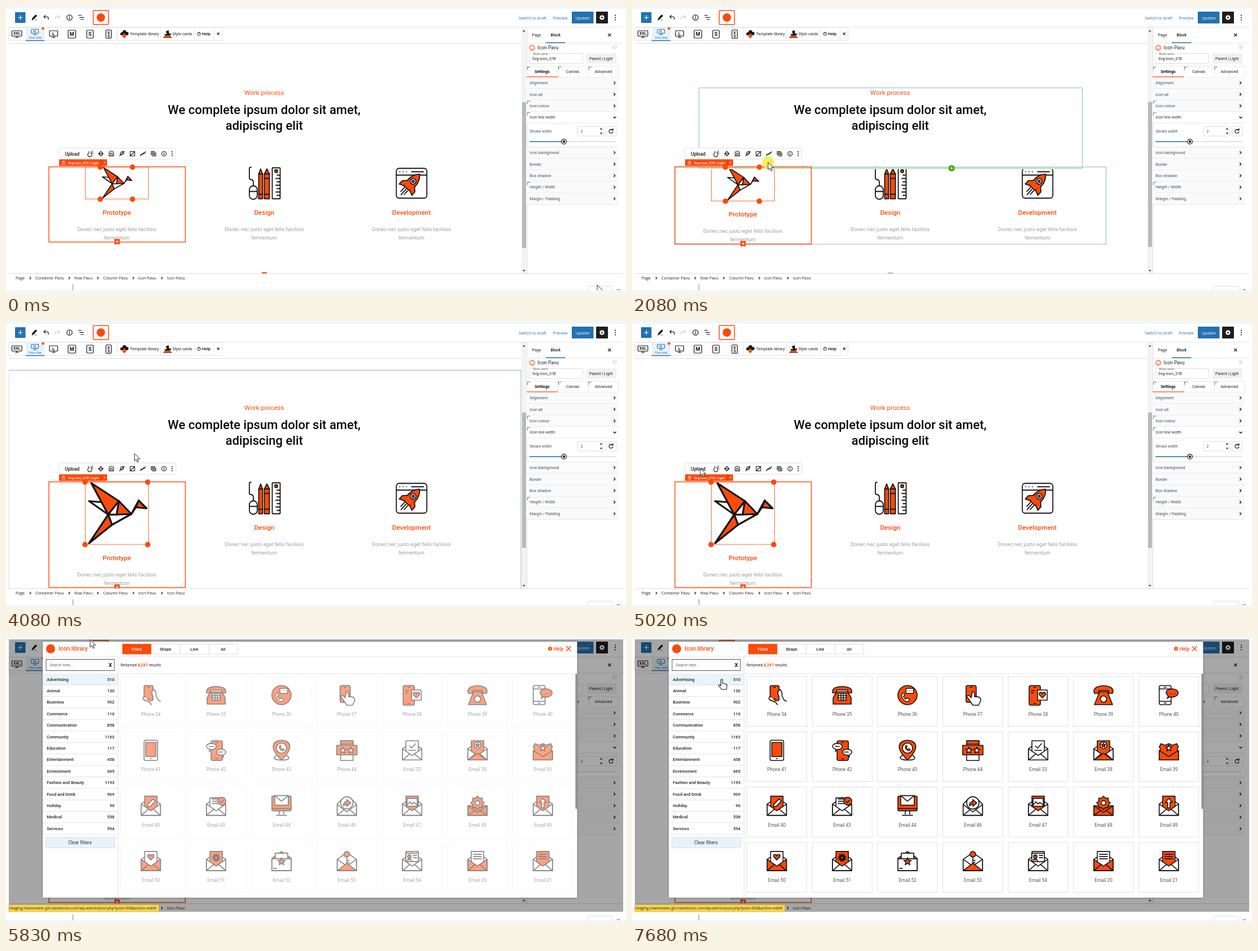
Write an HTML page that moves like this. It is 1098x510 px and loops after 8000 ms.

```html
<!DOCTYPE html>
<html lang="en">
<head>
<meta charset="utf-8">
<title>Icon library</title>
<style>
html,body{margin:0;width:100%;height:100%;overflow:hidden;background:#fff}
svg{display:block;width:100%;height:100%}
text{font-family:Roboto,sans-serif;white-space:pre}
.ui{font-family:"Open Sans","Noto Sans",sans-serif}
</style>
</head>
<body>
<svg id="stage" viewBox="0 0 1098 510"></svg>
<script>
const O = '#fc4a0b', INK = '#141414', BLUE = '#2271b1', SKY = '#86bcd6', W = '#fff';

// Drawing helpers
const R = (x, y, w, h, f = W, r = 0, more = '') => `<rect x="${x}" y="${y}" width="${w}" height="${h}" fill="${f}" rx="${r}" ${more}/>`;
const C = (x, y, r, f = W, more = '') => `<circle cx="${x}" cy="${y}" r="${r}" fill="${f}" ${more}/>`;
const P = (d, f = 'none', more = '') => `<path d="${d}" fill="${f}" ${more}/>`;
const T = (x, y, s, size = 7.05, f = '#222', more = '') => `<text x="${x}" y="${y}" font-size="${size}" fill="${f}" ${more}>${s}</text>`;
const G = (s, more = '') => `<g ${more}>${s}</g>`;
const at = (x, y, s, more = '') => G(s, `transform="translate(${x} ${y})" ${more}`);
const L = (d, c = INK, w = 1) => P(d, 'none', `stroke="${c}" stroke-width="${w}"`);
const MID = 'text-anchor="middle"', MED = 'font-weight="500"', BOLD = 'font-weight="700"', UI = 'class="ui"';
const pen = (w, c = INK) => `stroke="${c}" stroke-width="${w}" stroke-linejoin="round" stroke-linecap="round"`;
const chev = (x, y, s = 2.5, w = 1.3) => L(`M${x - s / 2} ${y - s}l${s} ${s}l${-s} ${s}`, INK, w);
const burst = (n, r, q, f, x = 0, y = 0) => {
  const pts = [];
  for (let i = 0; i < n * 2; i++) {
    const a = i * Math.PI / n - Math.PI / 2, k = i % 2 ? q : r;
    pts.push((x + k * Math.cos(a)).toFixed(1) + ' ' + (y + k * Math.sin(a)).toFixed(1));
  }
  return P('M' + pts.join('L') + 'Z', f);
};
const heart = (x, y, f) => P(`M${x} ${y + 5}l-5 -5c-3 -5 4 -7 5 -2c1 -5 8 -3 5 2z`, f);
const handset = (x, y, s, f) => at(x, y, P('M-5 -6C-8 1 0 9 6 6L7 3 3 1 1 3C-1 2 -3 0 -3 -2L-1 -3 -2 -7Z', f), `stroke-width="${1.3 / s}" `).replace(')"', `) scale(${s})"`);

function header() {
  let s = R(16, 11, 18.5, 19, BLUE, 1) + L('M21.5 20.5h8M25.5 16.5v8', W, 1.2);
  s += P('M46 25l1-3.5 5.5-6 2.2 2-5.7 6zM51 25h3', INK, pen(.7));
  s += P('M75 24v-2.5q0-2.5-3-2.5h-5m2.7-2.7-2.7 2.7 2.7 2.7', 'none', pen(1.2));
  s += P('M87 24v-2.5q0-2.5 3-2.5h5m-2.7-2.7 2.7 2.7-2.7 2.7', 'none', pen(1.1, '#ccc'));
  s += C(112.5, 20.5, 4.7, 'none', pen(1.2)) + L('M112.5 19.5v3.5M112.5 17.6v1.2', INK, 1.2);
  s += L('M128 16.5h6M130 20.3h8M132 24h6', INK, 1.2);
  s += R(154.5, 8, 27, 25, W, 1, pen(1.5, O)) + C(168, 20.5, 7.5, O);
  s += T(908, 23.6, 'Switch to draft', 7.25, BLUE, UI) + T(968.5, 23.6, 'Preview', 7.25, BLUE, UI);
  s += R(1002, 10, 38.5, 21, BLUE, 1) + T(1021.3, 23.6, 'Update', 7.3, W, UI + MID);
  s += R(1045, 10, 21, 21, '#1e1e1e', 1) + burst(8, 5, 3.6, W, 1055.5, 20.5) + C(1055.5, 20.5, 1.5, '#1e1e1e');
  return s + [16.5, 20.5, 24.5].map(y => C(1079, y, 1.1, INK)).join('') + L('M5 37.5H1093', '#e3e3e3');
}

const monitor = (x, y, w, h, label, c, size) =>
  R(x, y, w, h, W, 1, pen(1.2, c)) + P(`M${x + w / 2} ${y + h}v2.5m-3 0h6`, 'none', pen(1.2, c)) +
  T(x + w / 2, y + h / 2 + size * .36, label, size, c, MID + BOLD);
const device = (x, y, w, h, label) => R(x, y, w, h, W, 1.5, pen(1.2)) + T(x + w / 2, 53.2, label, 9, INK, MID + BOLD);

function sizeBar() {
  let s = R(5, 38, 377.5, 23.5, W, 0, 'stroke="#ddd" stroke-width=".8"') + R(35, 38, 33, 23, '#e8f2f8');
  s += L('M35 61.5h33', BLUE, 1.3) + C(65.5, 40, 2.3, O);
  s += monitor(10.5, 44, 17.5, 9.5, 'XXL', INK, 7) + monitor(45, 41.5, 12.5, 7, 'XL', BLUE, 6);
  s += T(51.5, 58.3, 'Your size', 5.6, BLUE, MID) + monitor(77, 44, 14.5, 9.5, 'L', INK, 8);
  s += device(110, 43, 13.5, 14, 'M') + device(143, 43, 11.5, 14, 'S') + R(177, 42.5, 9.5, 15, W, 1.5, pen(1.2));
  s += T(181.8, 49.7, 'X', 7, INK, MID + BOLD) + T(181.8, 56.3, 'S', 7, INK, MID + BOLD);
  s += P('M203 52c-2-5 2-6 3-5 1-6 7-5 7-1 5-1 5 5 2 6z', INK) + P('M207.5 49h4v4h2.5l-4.5 4.5-4.5-4.5h2.5z', O);
  s += T(219.7, 52.3, 'Template library', 7.15) + P('M279 56l4-4h6l4 4z', O, pen(.8)) + P('M280 50h5l-2-5 5-2 1 6h4l-2 3h-9z', INK);
  s += T(294.7, 52.3, 'Style cards', 7.15) + L('M197.5 38v23M273.5 38v23M333.5 38v23M368.5 38v23', '#e5e5e5');
  s += C(341.7, 49.5, 2.9, 'none', pen(.9)) + T(341.7, 51.4, '?', 5, INK, MID + BOLD) + T(347, 52.3, 'Help', 7.4, INK, MED);
  return s + L('M373.8 47.3l4 4m0-4l-4 4', INK, 1.2) + L('M5 66.5H913', '#ddd');
}

function sidebar() {
  const mark = (x, y) => L(`M${x} ${y + 5}v-5h5`, '#35a56c', 1.1);
  let s = R(922, 38, 171, 437) + L('M922.5 38V475', '#ddd') + T(931.5, 54, 'Page') + T(964.5, 54, 'Block', 7.1, '#111', MED);
  s += L('M922 66H1093', '#e3e3e3') + L('M956 65.3h34.5', BLUE, 1.5) + L('M1066.3 49l5 5m0-5l-5 5', INK, 1.1);
  s += C(932, 74.5, 4.4, W, pen(1.1, O)) + P('M929.5 75.5q2.5 3 5 0M930.5 73v.1M933.5 73v.1', 'none', pen(1, O));
  s += T(941.5, 77, 'Icon Pavu', 8.5) + C(1077.7, 73, 3.4, W, pen(.5, '#9ac')) + T(1077.7, 75, 'i', 5.5, BLUE, MID);
  s += R(926.5, 84.5, 95, 18, W, 1, 'stroke="#ddd"') + R(932, 83, 28, 4) + T(933.5, 87, 'Block name', 5, '#555');
  s += T(932, 95.6, 'Svg-icon_378') + R(1028, 84, 53, 18.5, '#f1f1f1') + T(1033, 95.6, 'Parent | Light', 7.05);
  s += R(922, 107, 163, 19.5, W, 0, 'stroke="#e6e6e6"') + L('M977.5 107v19M1031.5 107v19', '#e6e6e6') + L('M922 126h55.5', O, 1.5);
  s += T(949.5, 119.2, 'Settings', 7.1, '#111', MID + BOLD) + T(1003.7, 119.2, 'Canvas', 7.05, '#222', MID) + T(1058, 119.2, 'Advanced', 7.05, '#222', MID);
  s += mark(923.5, 108.5) + mark(978.5, 108.5) + mark(1032, 108.5);
  const rows = ['Alignment', 'Icon alt', 'Icon colour', 'Icon line width', 'Icon background', 'Border', 'Box shadow', 'Height / Width', 'Margin / Padding'];
  rows.forEach((name, i) => {
    const y = 136.6 + i * 20.45 + (i > 3 ? 42.2 : 0), open = i === 3;
    s += R(922, y - 10, 163, 20.4, open ? W : '#fafafa') + L(`M922 ${y + 10.2}h163`, '#e6e6e6') + T(927.3, y + 2.5, name, 7.05, open ? '#333' : '#35526d');
    s += open ? L(`M1075.5 ${y - 1.2}l2.5 2.5l2.5-2.5`, INK, 1.3) : chev(1077.5, y);
    if (i === 2 || i === 3 || i === 7) s += mark(923.5, y - 8.5);
  });
  s += L('M922 250.5h163', '#e6e6e6') + T(927.3, 225, 'Stroke width', 7.05, '#35526d');
  s += R(1012.5, 214, 45.5, 17, W, 1, 'stroke="#ddd"') + T(1017.5, 225, '2', 7.05, '#35526d');
  s += P('M1051.7 219.5l2.3-3 2.3 3zM1051.7 225.2l2.3 3 2.3-3z', '#333') + R(1062.5, 214, 18.5, 17, W, 1, 'stroke="#ddd"');
  s += P('M1074.3 220.5a3.5 3.5 0 1 0 .6 3M1075 217.7v3h-3', 'none', pen(1.2));
  return s + L('M927 241h153', '#d5dbe0', 1.3) + L('M927 241h61', BLUE, 1.5) + C(988, 241, 4.4, W, pen(1.2)) + C(988, 241, 2.2, INK);
}

function footer() {
  let s = R(5, 475, 1088, 30) + L('M5 475.5H1093', '#ddd');
  const crumbs = { 17: 'Page', 52: 'Container Pavu', 121: 'Row Pavu', 172: 'Column Pavu', 234: 'Icon Pavu', 285: 'Icon Pavu' };
  for (const x in crumbs) s += T(x, 486.2, crumbs[x], 7.1, '#222', UI);
  [43, 112, 162.5, 225.5, 276].forEach(x => s += chev(x, 483.5, 2, 1.1));
  s += L('M118.5 494.5V505', '#888') + T(17, 510.5, 'Custom fields', 8, '#555', UI) + R(1030, 498, 44, 15, W, 2, 'stroke="#d5dbe2"');
  return s + T(1037, 510.5, 'Clear all', 8, '#5a7fd0', UI) + L('M1082 503l5 5m0-5l-5 5', '#333');
}

const bird = () => G([
  ['M7 34L30 36 41 58Z', W], ['M11 2L60 34 41 58Z', O], ['M41 58L48 76 7 109Z', O], ['M41 58L82 57 48 76Z', W],
  ['M41 58L60 34 56 58Z', W], ['M60 34L82 57 56 58Z', O], ['M82 57L95 33 90 45Z', W], ['M95 33L109 47 90 45Z', O]
].map(p => P(...p)).join(''), pen(3.2));

const design = () => G(
  R(-26, 5, 14, 24, W, 7) + P('M-26 15h14M-19 5v-6q0-5-4-5t-3-6v-14q0-2 3-2') +
  P('M-9.5-16l3.5-9 3.5 9v44h-7z', O) + P('M-9.5-16h7M-9.5 20h7') +
  P('M.5-16l4.5-9 4.5 9v44h-9z', O) + P('M.5-16h9M.5-8h9M.5 20h9') +
  R(14.5, -27, 14, 55, W, 1) + C(21.5, -21, 2.5, O) + P('M28-14h-5m5 6h-7m7 6h-5m5 6h-7m7 6h-5m5 6h-7m7 6h-5'), pen(1.8));

const rocket = () => G(
  R(-27, -26, 54, 53, W, 5) + P('M-27-14h54M-21-20v.1M-15-20v.1M-9-20v.1M0-20h21') +
  G(P('M0-20C11-10 10 5 6 14h-12C-10 5-11-10 0-20Z', O) + P('M-8 2l-7 7v8l9-4M8 2l7 7v8l-9-4M-4 16v9M0 16v13M4 16v9', O) + C(0, -3, 5) + C(0, -3, 2, O), 'transform="rotate(42) translate(0 -1)"'), pen(1.8));

function page() {
  let s = T(457.3, 157.7, 'Work process', 11.6, O, MID);
  s += T(457.3, 191.7, 'We complete ipsum dolor sit amet,', 22, '#080808', MID + MED) + T(457.3, 219.7, 'adipiscing elit', 22, '#080808', MID + MED);
  const copy = (x, name) => T(x, 370.6, name, 11.6, O, MID + MED) + T(x, 399.5, 'Donec nec justo eget felis facilisis', 9.27, '#9d9d9d', MID) + T(x, 414.7, 'fermentum', 9.27, '#9d9d9d', MID);
  s += copy(457.3, 'Design') + copy(718, 'Development') + at(457, 314.5, design()) + at(718.3, 314.5, rocket());
  s += G(copy(196.3, 'Prototype'), 'id="proto"');
  s += R(5, 87.5, 907, 500, 'none', 0, `id="section" stroke="${SKY}"`);
  s += R(76, 286, 763.5, 136, 'none', 0, `id="row" stroke="${SKY}"`);
  s += G(bird(), 'id="bird"');
  s += R(140.5, 286, 112, 57, 'none', 0, `id="frame" stroke="${O}" stroke-width=".8"`);
  s += G([0, 1, 2, 3].map(() => C(0, 0, 4.8, O)).join(''), 'id="knobs"');
  s += G(R(118.5, 145.5, 679, 141, 'none', 0, `stroke="${SKY}"`) + R(119, 286.5, 678, 3.5) + L('M118 288.3H798', '#bfe3a8', 2.6) +
    C(566, 288.3, 5.5, '#36a80b') + L('M563.3 288.3h5.4M566 285.6v5.4', W, 1) + L('M453 475h9', '#555', 1.5), 'id="heading"');
  s += R(76, 285.8, 241.5, 134, 'none', 0, `id="column" stroke="${O}" stroke-width="1.4"`);
  s += G(R(192, 414, 9.5, 9.5, O) + L('M194 418.8h5.5M196.8 416v5.5', W, 1), 'id="add"');
  s += R(453, 473, 9, 3, O, 0, 'id="stub"');
  return G(s, 'clip-path="url(#view)"');
}

function blockBar() {
  let s = R(94, 253, 206, 19, W, 1, 'stroke="#d9d9d9" filter="url(#soft)"') + R(94, 253, 206, 19, W, 1, 'stroke="#e2e2e2" stroke-width=".7"');
  s += T(104.3, 265.6, 'Upload', 8.2, INK, MED);
  const icons = ['M-3-1a3.5 3.5 0 1 0 5 1M-4-3h3M1-1l3-4M3-1h2', 'M-4 0l4-4 4 4-4 4zM-4 0h8', 'M-4 4v-5a4 3.5 0 0 1 8 0v5zM-1.5 4v-5h3v5', 'M-4 4l8-8M-3 1q0-5 6-5 1 6-4 6z',
    'M-4-4h8v8h-8zM-4 4l8-8', 'M-4 4q-1-2 1-3l2-1M4-4q1 2-1 3l-2 1M-2 2l4-4', 'M-4-4h6v6h-6zM-2 4h6v-6M-1-3v4M-3-1h4', 'M-4 0a4 4 0 1 0 8 0a4 4 0 1 0-8 0M0-2v4'];
  icons.forEach((d, i) => s += at(149.3 + i * 18.65, 262.5, P(d), pen(1.1)));
  s += [259, 262.5, 266].map(y => C(294.3, y, 1.1, INK)).join('');
  s += R(94, 272.5, 85, 11.7, O, 1) + R(100, 277.7, 4, 3.5, 'none', 0, pen(.7, W)) + L('M101 277.5v-2h2v2', W, .7);
  return s + T(110, 280.6, 'Svg-icon_378 | Light', 6, W, MED) + L('M169.5 272.5v11.5', '#b53000', .8) + chev(174.5, 278.4, 1.6, .9).replace(INK, W);
}

// Library icons, drawn around 0,0 within about 36 px
const mob = (x, y, w, h, f) => R(x, y, w, h, f, 3) + P(`M${x + w / 2 - 2} ${y + h - 3}h4M${x + w / 2 - 2} ${y + 3}h4`);
const env = (letter, front, inside, y = -17) => P('M-17-3L0-15 17-3V17H-17Z', W) + R(-11, y, 22, 26, letter) + inside +
  P('M-17-3L0 9 17-3V17H-17Z', front) + P('M-17 17L-4 6M17 17L4 6');
const lines = 'M-7-12h14M-7-8h14M-7-4h14';
const library = [
  ['Phone 34', mob(-12, -17, 16, 27, O) + P('M-10 3q-6 0-3 5l11 5 3 4M4 3q-5-8 1-13 5 3 4 11l4 8 4 2', W)],
  ['Phone 35', P('M-10-6H10L16 5v11H-16V5Z', O) + P('M-17-7C-17-18 17-18 17-7v3h-7v-5h-20v5h-7Z', O) + R(-7, -3, 14, 12) + P('M-7 1H7M-7 5H7M-2-3V9M2-3V9')],
  ['Phone 36', C(0, 0, 17, O) + handset(-4, 4, 1.1, W) + R(-3, -12, 14, 9, W, 2) + P('M0-7.5h.1M4-7.5h.1M8-7.5h.1')],
  ['Phone 37', mob(-12, -17, 18, 30, O) + P('M-11 2q4-4 8 3l2-10q3-3 4 2v6q12-1 11 7l-4 8h-10z', W)],
  ['Phone 38', mob(-16, -17, 20, 35, O) + P('M-12-8h6M-12-4h4') + R(-1, -9, 17, 18) + heart(7.5, 0, O)],
  ['Phone 39', P('M-7-6H7L16 17H-16Z', O) + P('M-17-7C-17-20 17-20 17-7l-1 4h-7l-1-5h-16l-1 5h-7Z', O) + C(0, 7, 5.5)],
  ['Phone 40', mob(-17, -17, 21, 34, W) + P('M-17-11H4M-17 11H4') + P('M-3 6l2-4C-10-8 0-11 6-11s15 5 8 12q-5 4-13 2z', O) + P('M2-2h.1M6-2h.1M10-2h.1')],
  ['Phone 41', R(-12, -18, 24, 36, W, 3) + R(-9, -14, 18, 25, O) + P('M-1 14.5h2')],
  ['Phone 42', mob(-9, -17, 20, 35, O) + P('M-12 2l1-4q-7-2-6-6 2-5 9-4 9 0 8 6-2 5-8 4z', W) + P('M13 12l-1-4q6-2 5-6-2-4-8-4-9 0-8 6 2 5 8 4z', W) + P('M-12-7h7M4 3h7')],
  ['Phone 43', P('M-9 9C-28 19 28 21 9 9', W) + P('M0 17C-26-8-12-18 0-18S26-8 0 17Z', O) + C(0, -4, 9) + handset(0, -4, .7, O)],
  ['Phone 44', R(-11, -17, 22, 35, W) + R(-11, -17, 22, 6, O) + R(-18, -9, 36, 17, O) + burst(5, 6, 2.6, W, -7, 0) + burst(5, 6, 2.6, W, 7, 0)],
  ['Email 33', env(W, W, P('M-5-8l4 4 7-8') + P('M-6 0h12'))],
  ['Email 38', env(O, W, C(0, -9, 6) + burst(5, 4, 1.8, O, 0, -9)) + P('M-17 17L0 5 17 17Z', O)],
  ['Email 39', P('M-17-6q4 3 0 8v15h34V2q-4-5 0-8l-3-6-7 3-7-3-7 3-7-3z', O) + burst(5, 6, 2.5, W, 0, -4) + P('M-17 0L0 11 17 0V17H-17Z', O)],
  ['Email 40', env(O, W, P('M-6 2l1-5 9-9 4 4-9 9z', W))],
  ['Email 43', env(W, W, P(lines), -14) + C(10, -8, 7, O) + P('M7-8l2 3 4-5')],
  ['Email 44', R(-17, -17, 34, 26, O, 2) + P('M-17 5h34M-4 9v6M4 9v6M-9 17H9') + R(-12, -18, 24, 17) + P('M-12-18L0-8 12-18')],
  ['Email 46', P('M-17-3L-9-11h18L17-3V17H-17Z', W) + C(0, -5, 11) + P('M-6 0q0-7 6-7v-4l7 6-7 6v-4z', O) + P('M-17-2L0 11 17-2V17H-17Z', W) + P('M-17 17L-5 7M17 17L5 7')],
  ['Email 47', env(O, W, R(-9, -13, 18, 14) + P('M-9-1l5-6 4 4 3-3 6 5'))],
  ['Email 48', P('M-17 0H17V17H-17Z', O) + burst(8, 12, 9, O, 0, -5) + C(0, -5, 4) + P('M-17 0L0 12 17 0V17H-17Z', O) + P('M-17 17L-4 8M17 17L4 8')],
  ['Email 49', env(O, W, P('M-2 4v-10h-4l6-7 6 7h-4v10z', W))],
  ['Email 50', env(W, O, heart(0, -7, O))],
  ['Email 51', env(O, W, burst(9, 7, 4, INK, 0, -6) + C(0, -6, 2.5, O))],
  ['Email 52', P('M-17-5L0-17 17-5V17H-17Z', O) + R(-11, -14, 22, 18) + P('M-17-4H17V17H-17Z', W) + burst(5, 7, 3, O, 0, 1) + P('M-14 13h5')],
  ['Email 53', P('M-17-3L0-15 17-3V17H-17Z', W) + C(0, -12, 5, O) + P('M0-7V8M0 3h4M0-1h4') + P('M-17-3L0 9 17-3V17H-17Z', W) + P('M-17 17L0 4 17 17Z', O)],
  ['Email 54', env(W, W, R(-11, -14, 22, 15) + C(-5, -8, 3, O) + P('M-9-1q4-6 8 0M2-10h6M2-6h6', O))],
  ['Email 20', env(W, O, P(lines))],
  ['Email 21', env(O, W, P(lines))]
];

const cats = { Advertising: 510, Animal: 130, Business: 902, Commerce: 116, Communication: 858, Community: 1163, Education: 117, Entertainment: 458,
  Environment: 665, 'Fashion and Beauty': 1193, 'Food and Drink': 909, Holiday: 96, Medical: 538, Services: 594 };
const PITCH = 20.4;

function modal() {
  let s = R(65, 10, 946.5, 455, '#000', 0, 'opacity=".45" filter="url(#soft)"') + R(65, 10, 946.5, 455) + C(79, 22.8, 8, O);
  s += T(93, 26.4, 'Icon library', 10.4, O, MED);
  ['Filled', 'Shape', 'Line', 'All'].forEach((name, i) => {
    s += R(206.5 + i * 51, 14.5, 51, 17.5, i ? W : O, 0, `stroke="${i ? '#d5d5d5' : O}" stroke-width=".8"`) + T(231.5 + i * 51, 25.7, name, 7.4, i ? '#222' : W, MID + MED);
  });
  s += C(963.5, 22.5, 3.5, O) + T(963.5, 24.7, '?', 6, W, MID + BOLD) + T(969.5, 25.6, 'Help', 8.6, O, MED) + L('M992 18.2l8.5 8.5m0-8.5l-8.5 8.5', O, 1.4);
  s += L('M65 37H1011M198.5 37V465M198 67H1008', '#e4e4e4') + R(71, 41.5, 121, 20, W, 0, 'stroke="#444" stroke-width=".9"');
  s += T(77.5, 54, 'Search here...', 6.9, '#666') + T(184.7, 55.4, 'X', 9.3, INK, MID + BOLD) + L('M77.5 47v9', INK, .9).replace('<path', '<path id="caret"');
  s += T(203, 54, `Returned <tspan fill="${O}" ${BOLD}>8,247</tspan> results`, 7.1);
  s += R(65.5, 67.2, 132.5, PITCH, '#e9f3f9', 0, 'id="hover"');
  Object.keys(cats).forEach((name, i) => {
    const y = 77 + i * PITCH;
    s += L(`M65 ${y + 10.2}h133`, '#e4e4e4') + T(72.3, y + 2.6, name, 7.5, '#222', MED) + T(192, y + 2.6, cats[name], 7.5, '#222', 'text-anchor="end" ' + MED);
  });
  s += R(70.5, 357.5, 122.5, 19, '#e8f2f8', 0, 'stroke="#d3dde3" stroke-width=".8"') + T(131, 369.8, 'Clear filters', 8.2, '#333', MID);
  let borders = '', cards = '';
  library.forEach(([name, art], i) => {
    const x = 203.5 + i % 7 * 115.7, y = 72 + Math.floor(i / 7) * 98.3;
    borders += R(x, y, 106, 88.5, 'none', 0, 'stroke="#d9dce1" stroke-width=".9"');
    cards += at(x + 53, y + 33, art, 'fill="none" ' + pen(1.6)) + T(x + 53, y + 70, name, 8.2, '#555', MID);
  });
  return s + G(borders, 'id="borders"') + G(cards, 'id="cards"') + R(1008.5, 67, 3, 240, '#8a8a8a');
}

const cursors = G(P('M0 0V13L3 10.2 5 15 7.3 14 5.2 9.3H9.3Z', W, pen(.9)), 'id="arrow"') +
  G(P('M-1.5 1.5C-1.5-.8 1.5-.8 1.5 1.5V7L7 8.2C9 8.7 9.5 10 9.2 11.5L8 18H0L-5.5 11.5C-6 10-4.5 9-3 10L-1.5 11.5Z', W, pen(1.1)), 'id="hand"') +
  G(P('M7.5-7.5v6l-2-2-9 9 2 2h-6v-6l2 2 9-9-2-2z', '#fff6c8', pen(.9, '#7a5a20')), 'id="resize"');

document.getElementById('stage').innerHTML =
  `<defs><clipPath id="view"><rect x="5" y="67" width="908" height="408.5"/></clipPath>
  <filter id="soft" x="-10%" y="-20%" width="120%" height="150%"><feGaussianBlur stdDeviation="1.5"/></filter></defs>` +
  R(0, 0, 1098, 510) + page() + header() + sizeBar() +
  R(913, 38, 8.5, 437, '#f3f3f3') + R(914, 171, 7, 259, '#b9b9b9', 0, 'id="thumb"') + P('M914.8 45.5l2.4-3 2.4 3zM914.8 469l2.4 3 2.4-3z', '#444') +
  blockBar() + G('', 'id="front"') + sidebar() + footer() + R(5, 6, 1088, 484, '#000', 0, 'id="shade"') + G(modal(), 'id="modal"') +
  G(R(5, 477.5, 266, 12.5, '#f9d84c', 0, 'stroke="#b99a2a" stroke-width=".6"') + T(5, 486.4, '/staging.maximaster.git.maxiblocks.com/wp-admin/post.php?post=504&amp;action=edit#', 6.6, '#222', UI), 'id="link"') +
  G(C(0, 0, 10.5, '#f9ec35', 'id="press"') + cursors, 'id="mouse"') +
  R(0, 0, 1098, 5.3, '#f0f7fb') + R(0, 505, 1098, 5, '#f0f7fb');

const $ = {};
document.querySelectorAll('[id]').forEach(e => $[e.id] = e);
$.front.append($.knobs);

const set = (e, o) => { for (const k in o) e.setAttribute(k, o[k]); };
const show = (e, on) => e.setAttribute('display', on ? 'inline' : 'none');
const within = (t, a, b) => t >= a && t < b;
const ramp = (t, a, b) => Math.min(1, Math.max(0, (t - a) / (b - a)));

// Eased value of a keyed track: [time, value...]
function track(keys, t) {
  let i = 0;
  while (i < keys.length - 2 && t >= keys[i + 1][0]) i++;
  const a = keys[i], b = keys[i + 1], u = ramp(t, a[0], b[0]), k = u * u * (3 - 2 * u);
  return a.slice(1).map((v, j) => v + (b[j + 1] - v) * k);
}
const path = [[70, 1047, 496], [580, 229, 297], [1200, 229, 297], [1600, 238, 282], [2010, 238, 282], [2080, 241, 278], [2760, 289, 223], [3730, 289, 223],
  [4490, 150, 252], [5020, 121, 262], [5300, 121, 262], [5490, 119, 261], [5830, 149, 7], [6140, 149, 7], [6500, 166, 78], [7550, 166, 78], [7680, 159, 77]];
const box = [[1200, 57, 57], [1600, 59, 59.5], [2010, 59, 59.5], [2080, 60, 60.5], [2760, 111, 123.5], [3450, 111, 123.5], [3590, 111, 111]];

function draw(t) {
  const [x, y] = track(path, t), [w, h] = track(box, t), grow = h - 57, size = Math.min(w, h);
  set($.bird, { transform: `translate(${195.5 - w / 2} ${286 + (h - size) / 2}) scale(${size / 111})` });
  set($.frame, { height: h });
  [...$.knobs.children].forEach((k, i) => set(k, { cx: 195.5 + (i % 2 - .5) * w, cy: 286.3 + (i > 1 ? h : 0) }));
  set($.column, { height: 133.7 + grow });
  set($.row, { height: 133.7 + grow });
  set($.proto, { transform: `translate(0 ${grow})` });
  set($.add, { transform: `translate(0 ${grow})` });
  set($.thumb, { y: 171 - grow * .155, height: 259 - grow * .345 });

  const heading = within(t, 1400, 2150);
  show($.heading, heading);
  show($.section, within(t, 200, 1300) || within(t, 2200, 4200));
  show($.row, within(t, 270, 3520));
  show($.stub, t < 150);

  const open = t >= 5160, inList = open && within(y, 67, 352);
  set($.shade, { opacity: .35 * ramp(t, 5090, 5230) });
  show($.modal, open);
  set($.hover, { y: 66.8 + PITCH * Math.min(13, Math.max(0, Math.floor((y - 66.8) / PITCH))) });
  show($.caret, Math.floor((t - 5030) / 530) % 2 === 0);
  const fade = ramp(t, 5435, 6200);
  set($.cards, { opacity: fade });
  set($.borders, { opacity: fade * fade });
  show($.link, within(t, 5700, 6080) || t >= 6500);

  const sizing = within(t, 540, 2010) || within(t, 2150, 3730);
  set($.mouse, { transform: `translate(${x} ${y})` });
  set($.press, { opacity: t < 3310 ? .85 * ramp(t, 900, 1060) : 0 });
  show($.resize, sizing);
  show($.hand, inList);
  show($.arrow, !sizing && !inList);
}

const start = performance.now();
function tick() {
  draw((performance.now() - start) % 8000);
  requestAnimationFrame(tick);
}
tick();
</script>
</body>
</html>
```
